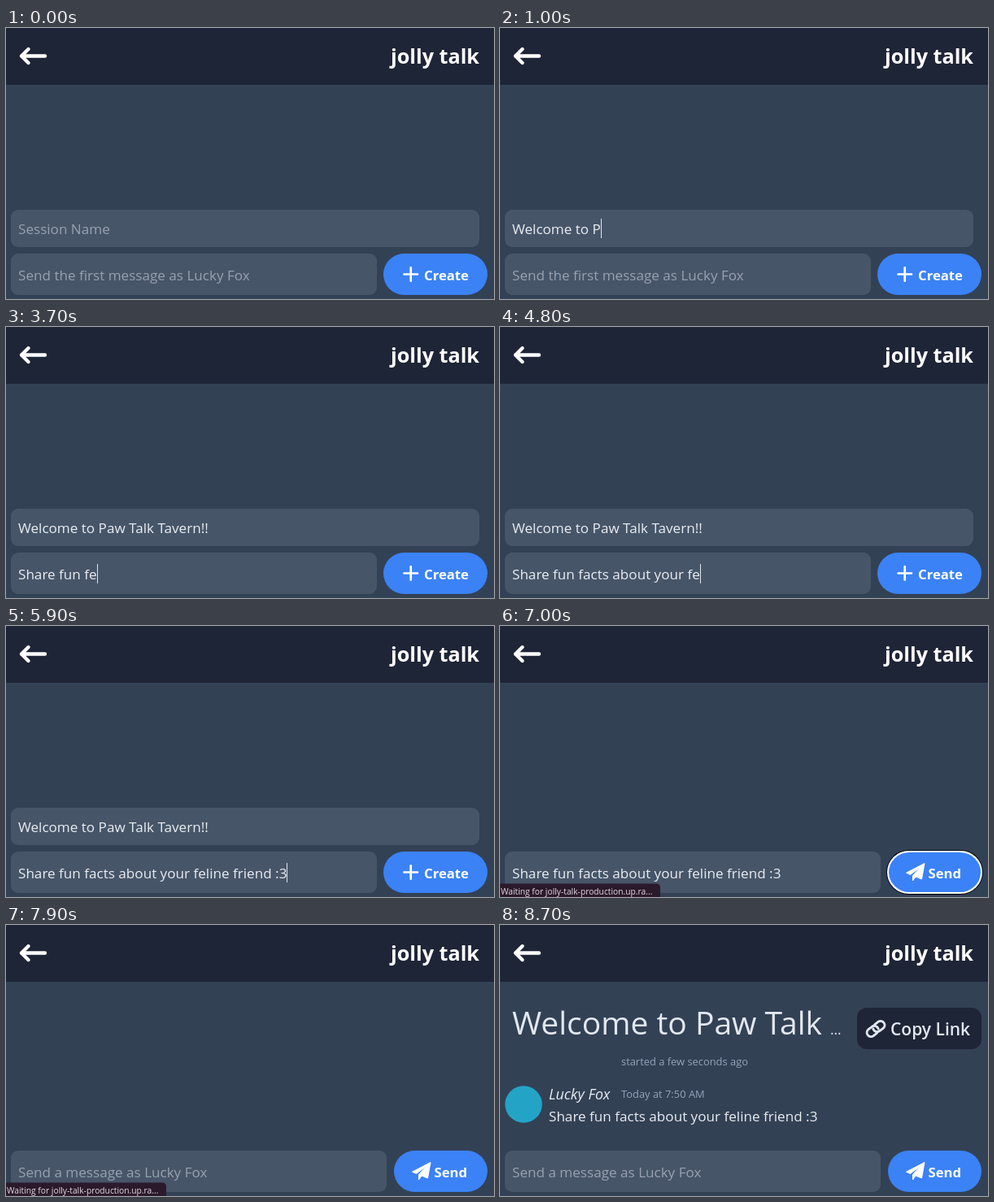
Write an HTML page that moves like this. It is 600 px wide and 334 px high and loops after 8.8 s.

```html
<!DOCTYPE html>
<html lang="en">
<head>
<meta charset="utf-8">
<title>Chat session</title>
<style>
  html, body { margin: 0; width: 100%; height: 100%; overflow: hidden; background: #334155; }
  svg { display: block; width: 600px; height: 334px; }
  text { font: 17.1px "Open Sans", "Noto Sans", sans-serif; fill: #e9edf2; white-space: pre; }
  .field { fill: #475569; }
  .hint { fill: #97a1b0; }
  .dark { fill: #1e2537; }
  .blue { fill: #3b82f6; }
  .bold { font-weight: 700; font-size: 16.7px; fill: #fff; }
  .small { font-size: 12.9px; fill: #94a3b8; }
  .line { fill: none; stroke: #fff; stroke-linecap: round; stroke-linejoin: round; }
</style>
</head>
<body>
<svg viewBox="0 0 600 334">
  <rect width="600" height="334" fill="#334155"/>
  <rect class="dark" width="600" height="70"/>
  <path class="line" stroke-width="4.4" d="M48 34.5H19M27.5 26L19 34.5L27.5 43"/>
  <text class="bold" x="582" y="44" text-anchor="end" style="font-size:25.2px">jolly talk</text>

  <g id="session">
    <text x="15" y="135" style="font-size:39px;fill:#e2e8f0">Welcome to Paw Talk</text>
    <text x="406" y="135">...</text>
    <text class="small" x="149" y="173">started a few seconds ago</text>
    <rect class="dark" x="439" y="102" width="153" height="51" rx="12"/>
    <g class="line" stroke-width="2.9" transform="rotate(-38 462 128)" style="stroke:#e2e8f0">
      <path d="M460 133H454.500A5 5 0 0 1 454.500 123H460A5 5 0 0 1 464.500 130"/>
      <path d="M464 123H469.500A5 5 0 0 1 469.500 133H464A5 5 0 0 1 459.500 126"/>
    </g>
    <text x="480" y="136" style="font-size:21px;font-weight:600;fill:#e2e8f0">Copy Link</text>
    <circle cx="29" cy="221" r="22.800" fill="#23a4c6"/>
    <text x="60" y="215" style="font-size:17.9px;font-style:italic">Lucky Fox</text>
    <text class="small" x="149" y="213">Today at 7:50 AM</text>
    <text x="60" y="242">Share fun facts about your feline friend :3</text>
  </g>

  <g id="nameRow">
    <rect class="field" x="6" y="224" width="576" height="46" rx="9"/>
    <text id="nameText" x="15" y="254"></text>
  </g>

  <rect id="messageBox" class="field" x="6" y="278" height="51" rx="9"/>
  <text id="messageText" x="15" y="310.5"></text>
  <rect id="caret" width="1" height="24" fill="#dfe5ec"/>

  <g id="ring">
    <rect id="ringOuter" rx="27.500" fill="#05070c"/>
    <rect id="ringInner" rx="26.500" fill="#fff"/>
  </g>
  <rect id="button" class="blue" rx="25.500"/>
  <g id="create">
    <path class="line" stroke-width="2.7" d="M489.500 303.500H506M497.700 295.300V311.700"/>
    <text class="bold" x="514" y="310.5">Create</text>
  </g>
  <g id="send">
    <path fill="#fff" stroke="#fff" stroke-linejoin="round" d="M522 292.500L518.500 312L511 309L507.500 314V307.500L517.500 296.500L504.500 306.500L499.500 304.200Z"/>
    <text class="bold" x="526.5" y="310.5">Send</text>
  </g>

  <g id="status">
    <path fill="#2b1a2b" d="M0 317.500H192Q197 317.500 197 322.500V334H0Z"/>
    <text x="1" y="331" style="font-size:10.25px;fill:#e3dae3">Waiting for jolly-talk-production.up.ra...</text>
  </g>
</svg>
<script>
const LOOP = 8800, STEP = 100;
const NAME = "Welcome to Paw Talk Tavern!!";
const MESSAGE = "Share fun facts about your feline friend :3";
const TYPO = "Share fun fe";

// Times in ms paired with the number of characters typed by then
const nameKeys = [[100, 0], [2000, 26], [2200, 28]];
const messageKeys = [[2900, 0], [3700, 12], [3800, 11], [4700, 28], [5600, 40], [5900, 43]];

const FOCUS_MESSAGE = 2500, CLICK = 6100, OPEN = 7000, CLEAR = 7900, LOADED = 8300;

const el = id => document.getElementById(id);
const show = (id, on) => el(id).style.display = on ? "" : "none";

function typed(keys, t) {
  if (t <= keys[0][0]) return 0;
  for (let i = 1; i < keys.length; i++) {
    const [t0, n0] = keys[i - 1], [t1, n1] = keys[i];
    if (t <= t1) return Math.floor(n0 + (n1 - n0) * (t - t0) / (t1 - t0));
  }
  return keys[keys.length - 1][1];
}

function setInput(id, value, hint) {
  el(id).textContent = value || hint;
  el(id).setAttribute("class", value ? "" : "hint");
  return 15 + (value ? el(id).getComputedTextLength() : 0);
}

function setButton(id, left, grow) {
  const box = { x: left - grow, y: 278 - grow, width: 592 - left + 2 * grow, height: 51 + 2 * grow };
  for (const key in box) el(id).setAttribute(key, box[key]);
}

function draw(t) {
  const open = t >= OPEN, cleared = t >= CLEAR, loaded = t >= LOADED;
  const focused = t >= CLICK && !cleared;
  const left = open ? 477 : 464;

  const message = cleared ? "" : (t < 3800 ? TYPO : MESSAGE).slice(0, typed(messageKeys, t));
  const nameEnd = setInput("nameText", NAME.slice(0, typed(nameKeys, t)), "Session Name");
  const messageEnd = setInput("messageText", message,
    open ? "Send a message as Lucky Fox" : "Send the first message as Lucky Fox");

  const inMessage = t >= FOCUS_MESSAGE;
  el("caret").setAttribute("x", Math.round(inMessage ? messageEnd : nameEnd));
  el("caret").setAttribute("y", inMessage ? 292 : 235);
  show("caret", t >= 100 && t < CLICK);

  el("messageBox").setAttribute("width", open ? 462 : 450);
  setButton("ringOuter", left, 2);
  setButton("ringInner", left, 1);
  setButton("button", left, focused ? -1 : 0);
  show("ring", focused);
  show("nameRow", !open);
  show("create", !open);
  show("send", open);
  show("status", open && !loaded);
  show("session", loaded);
}

const start = performance.now();
function tick() {
  const t = (performance.now() - start) % LOOP;
  draw(Math.floor(t / STEP) * STEP);
  requestAnimationFrame(tick);
}
tick();
</script>
</body>
</html>
```
